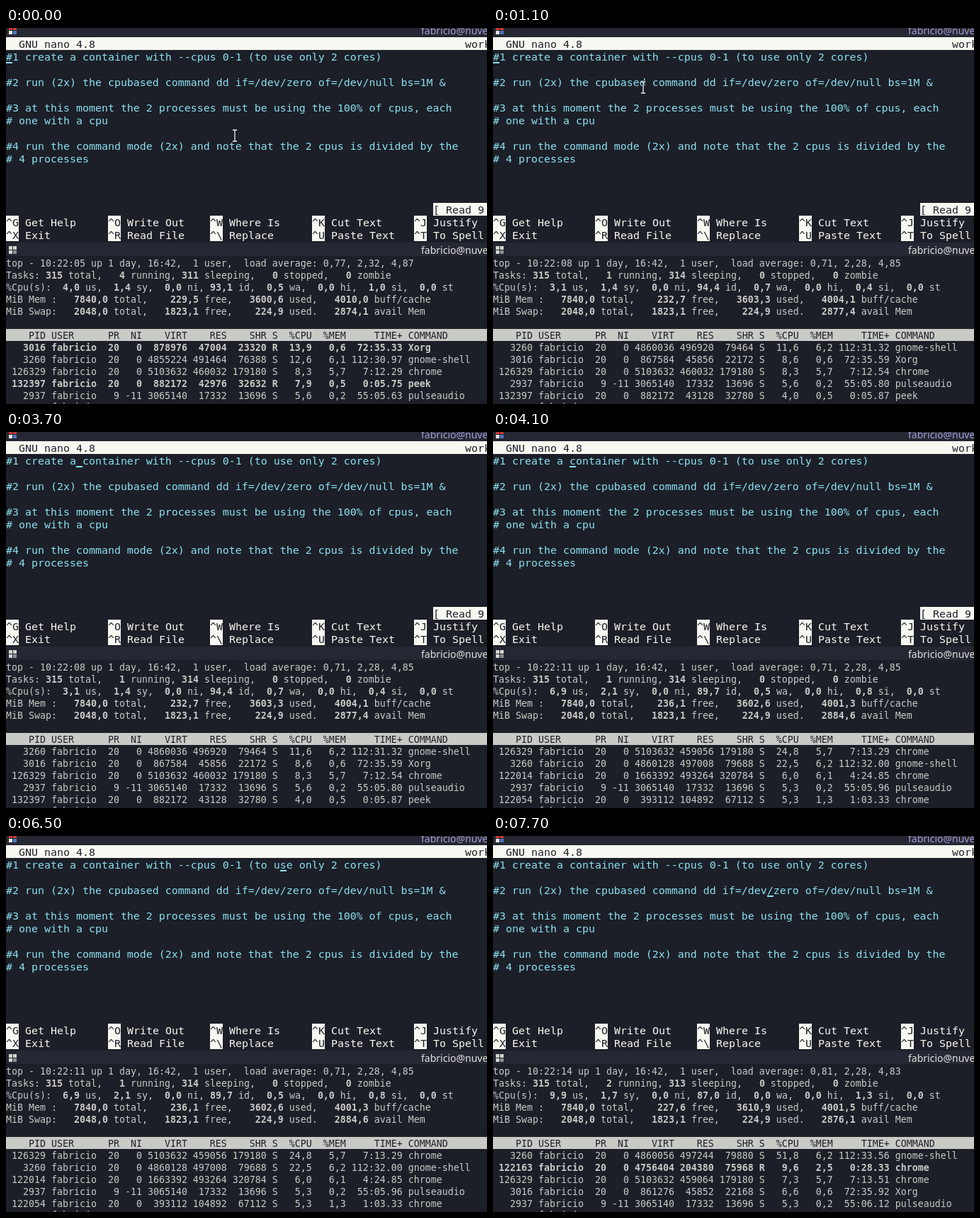
Recreate the animation shown at these times as an HTML page. Size 679x531 px, loop 8000 ms.

```html
<!DOCTYPE html>
<html lang="en">
<head>
<meta charset="utf-8">
<title>Terminal session</title>
<style>
  html, body { margin: 0; width: 100%; height: 100%; overflow: hidden; background: #1c1f27; }
  svg { display: block; width: 679px; height: 531px; }
  text { white-space: pre; font-family: "DejaVu Sans Mono", monospace; }
  .nano { font-size: 14.95px; fill: #f8f8f2; }
  .top { font-size: 13.29px; fill: #c8cac6; }
  .bar { font-family: "Noto Sans", sans-serif; font-size: 14px; }
  .note { fill: #8be0f2; }
  .inv { fill: #1c1f27; }
  .b { font-weight: bold; }
</style>
</head>
<body>
<svg id="stage" viewBox="0 0 679 531"></svg>
<script>
const LOOP = 8000;
const USER = 'fabricio';
const HOST = USER + '@nuvemar';
const PAPER = '#f8f8f2';
const stage = document.getElementById('stage');

function add(parent, tag, attrs, html = '') {
  const el = document.createElementNS('http://www.w3.org/2000/svg', tag);
  for (const key in attrs) el.setAttribute(key, attrs[key]);
  el.innerHTML = html;
  return parent.appendChild(el);
}
const rect = (parent, x, y, width, height, fill) =>
  add(parent, 'rect', { x, y, width, height, fill });
const text = (parent, x, y, cls, html) =>
  add(parent, 'text', { x, y, class: cls }, html);

// Upper pane: 9 x 18 cells
const nano = (parent, col, row, str, cls = '') =>
  text(parent, col * 9, 28 + row * 18, 'nano ' + cls, str);
const invert = (parent, col, row, cols) =>
  rect(parent, col * 9, 13 + row * 18, cols * 9, 18, PAPER);

function titleBar(y, h, baseline, color, tiles) {
  rect(stage, 0, y, 679, h, '#252832');
  text(stage, 586, baseline, 'bar', HOST).style.fill = color;
  tiles.forEach((fill, i) =>
    rect(stage, 4 + i % 2 * 6, baseline - 11 + (i >> 1) * 6, 5, 5, fill));
}

function drawEditor() {
  titleBar(0, 13, 9, '#a79fd8', ['#d23a34', '#d23a34', '#e8e6e6', '#4a74c4']);
  titleBar(303, 19, 319, '#e4e4e2', ['#d4d4d2', '#d4d4d2', '#d4d4d2', '#8c8e92']);
  invert(stage, 0, 0, 76);
  nano(stage, 2, 0, 'GNU nano 4.8', 'inv');
  nano(stage, 72, 0, 'work', 'inv');
  [
    '#1 create a container with --cpus 0-1 (to use only 2 cores)',
    '',
    '#2 run (2x) the cpubased command dd if=/dev/zero of=/dev/null bs=1M &amp;',
    '',
    '#3 at this moment the 2 processes must be using the 100% of cpus, each',
    '# one with a cpu',
    '',
    '#4 run the command mode (2x) and note that the 2 cpus is divided by the',
    '# 4 processes'
  ].forEach((line, i) => nano(stage, 0, i + 1, line, 'note'));
  [
    ['^G Get Help', '^O Write Out', '^W Where Is', '^K Cut Text', '^J Justify'],
    ['^X Exit', '^R Read File', '^\\ Replace', '^U Paste Text', '^T To Spell']
  ].forEach((keys, r) => keys.forEach((key, i) => {
    invert(stage, i * 16, 14 + r, 2);
    nano(stage, i * 16, 14 + r, key.slice(0, 2), 'inv');
    nano(stage, i * 16 + 3, 14 + r, key.slice(3));
  }));
}

// Lower pane: 8 x 17 cells
const topLine = (parent, row, str, cls = '') =>
  text(parent, 0, 337 + row * 17, 'top ' + cls, str);
const boldNumbers = str => str.replace(/\d+(,\d)?/g, '<tspan class="b">$&</tspan>');

function process(line) {
  const [pid, virt, res, shr, state, cpu, mem, time, cmd] = line.split(' ');
  const [pr, ni] = cmd === 'pulseaudio' ? ['9', '-11'] : ['20', '0'];
  return pid.padStart(7) + ' ' + USER.padEnd(9) + pr.padStart(3) + ni.padStart(4) +
    virt.padStart(8) + res.padStart(7) + shr.padStart(7) + ' ' + state +
    cpu.padStart(6) + mem.padStart(6) + time.padStart(10) + ' ' + cmd;
}

function topScreen({ clock, load, tasks, cpu, mem, avail, rows }) {
  const g = add(stage, 'g', {});
  const [us, sy, id, wa, si] = cpu.split(' ').map(v => v.padStart(4));
  const [free, used, cache] = mem.split(' ').map(v => v.padStart(6));
  const [running, sleeping] = tasks.split(' ').map(v => v.padStart(3));
  topLine(g, 0, `top - 10:22:${clock} up 1 day, 16:42,  1 user,  load average: ${load}`);
  [
    `Tasks: 315 total, ${running} running, ${sleeping} sleeping,   0 stopped,   0 zombie`,
    `%Cpu(s): ${us} us, ${sy} sy,  0,0 ni, ${id} id, ${wa} wa,  0,0 hi, ${si} si,  0,0 st`,
    `MiB Mem :   7840,0 total,   ${free} free,   ${used} used,   ${cache} buff/cache`,
    `MiB Swap:   2048,0 total,   1823,1 free,    224,9 used.   ${avail} avail Mem`
  ].forEach((line, i) => topLine(g, i + 1, boldNumbers(line)));
  rows.forEach((line, i) =>
    topLine(g, i + 7, process(line), line.includes(' R ') ? 'b' : ''));
  return g;
}

drawEditor();
rect(stage, 0, 425, 679, 17, '#c8cac6');
topLine(stage, 6, '    PID USER      PR  NI    VIRT    RES    SHR S  %CPU  %MEM     TIME+ COMMAND', 'inv');
text(stage, 64, 540, 'top', USER);

const screens = [
  {
    clock: '05', load: '0,77, 2,32, 4,87', tasks: '4 311',
    cpu: '4,0 1,4 93,1 0,5 1,0', mem: '229,5 3600,6 4010,0', avail: '2874,1',
    rows: [
      '3016 878976 47004 23320 R 13,9 0,6 72:35.33 Xorg',
      '3260 4855224 491464 76388 S 12,6 6,1 112:30.97 gnome-shell',
      '126329 5103632 460032 179180 S 8,3 5,7 7:12.29 chrome',
      '132397 882172 42976 32632 R 7,9 0,5 0:05.75 peek',
      '2937 3065140 17332 13696 S 5,6 0,2 55:05.63 pulseaudio'
    ]
  },
  {
    clock: '08', load: '0,71, 2,28, 4,85', tasks: '1 314',
    cpu: '3,1 1,4 94,4 0,7 0,4', mem: '232,7 3603,3 4004,1', avail: '2877,4',
    rows: [
      '3260 4860036 496920 79464 S 11,6 6,2 112:31.32 gnome-shell',
      '3016 867584 45856 22172 S 8,6 0,6 72:35.59 Xorg',
      '126329 5103632 460032 179180 S 8,3 5,7 7:12.54 chrome',
      '2937 3065140 17332 13696 S 5,6 0,2 55:05.80 pulseaudio',
      '132397 882172 43128 32780 S 4,0 0,5 0:05.87 peek'
    ]
  },
  {
    clock: '11', load: '0,71, 2,28, 4,85', tasks: '1 314',
    cpu: '6,9 2,1 89,7 0,5 0,8', mem: '236,1 3602,6 4001,3', avail: '2884,6',
    rows: [
      '126329 5103632 459056 179180 S 24,8 5,7 7:13.29 chrome',
      '3260 4860128 497008 79688 S 22,5 6,2 112:32.00 gnome-shell',
      '122014 1663392 493264 320784 S 6,0 6,1 4:24.85 chrome',
      '2937 3065140 17332 13696 S 5,3 0,2 55:05.96 pulseaudio',
      '122054 393112 104892 67112 S 5,3 1,3 1:03.33 chrome'
    ]
  },
  {
    clock: '14', load: '0,81, 2,28, 4,83', tasks: '2 313',
    cpu: '9,9 1,7 87,0 0,0 1,3', mem: '227,6 3610,9 4001,5', avail: '2876,1',
    rows: [
      '3260 4860056 497244 79880 S 51,8 6,2 112:33.56 gnome-shell',
      '122163 4756404 204380 75968 R 9,6 2,5 0:28.33 chrome',
      '126329 5103632 459064 179180 S 7,3 5,7 7:13.51 chrome',
      '3016 861276 45852 22168 S 6,6 0,6 72:35.92 Xorg',
      '2937 3065140 17332 13696 S 5,3 0,2 55:06.12 pulseaudio'
    ]
  }
].map(topScreen);

const status = add(stage, 'g', {});
invert(status, 67, 13, 16);
nano(status, 67, 13, '[ Read 9 lines ]', 'inv');

const caret = rect(stage, 0, 0, 9, 2, '#8be0f2');

const mouse = add(stage, 'g', { fill: 'none' });
const beam = 'M-3-8H-1L0-7L1-8H3M0-7V7M-3 8H-1L0 7L1 8H3';
add(mouse, 'path', { d: beam, stroke: '#0c0d10', 'stroke-width': 3 });
add(mouse, 'path', { d: beam, stroke: '#fff', 'stroke-width': 1.3 });

// time, column, row
const caretSteps = [
  [0, 0, 1], [3000, 1, 1], [3300, 4, 1], [3400, 7, 1], [3500, 10, 1], [3700, 11, 1],
  [4000, 12, 1], [4300, 15, 1], [4400, 18, 1], [4500, 21, 1], [4600, 24, 1],
  [4700, 27, 1], [4800, 30, 1], [5000, 31, 1], [5300, 32, 1], [5500, 35, 1],
  [5600, 38, 1], [6000, 39, 1], [6300, 42, 1], [6500, 43, 1], [7100, 0, 2], [7700, 43, 3]
];
// time, x, y
const mouseSteps = [
  [0, 323, 152], [300, 325, 141], [400, 326, 131.5], [600, 305, 124], [700, 265, 112],
  [800, 230, 104], [900, 212, 100], [1100, 212, 84], [1200, 185, 66], [1300, 148, 50],
  [1400, 126, 42.5], [1600, 81.5, 42], [2100, 78.5, 44]
];
const at = (steps, t) => steps.findLast(step => step[0] <= t);

function render(t) {
  const [, col, row] = at(caretSteps, t);
  caret.setAttribute('x', col * 9);
  caret.setAttribute('y', 30 + row * 18);

  const [, x, y] = at(mouseSteps, t);
  mouse.setAttribute('transform', `translate(${x} ${y})`);
  mouse.style.display = t < 2700 ? '' : 'none';

  status.style.display = t < 4700 ? '' : 'none';
  const shown = Math.floor((t + 1900) / 3000);
  screens.forEach((g, i) => g.style.display = i === shown ? '' : 'none');
}

const start = performance.now();
function tick() {
  render((performance.now() - start) % LOOP);
  requestAnimationFrame(tick);
}
tick();
</script>
</body>
</html>
```
